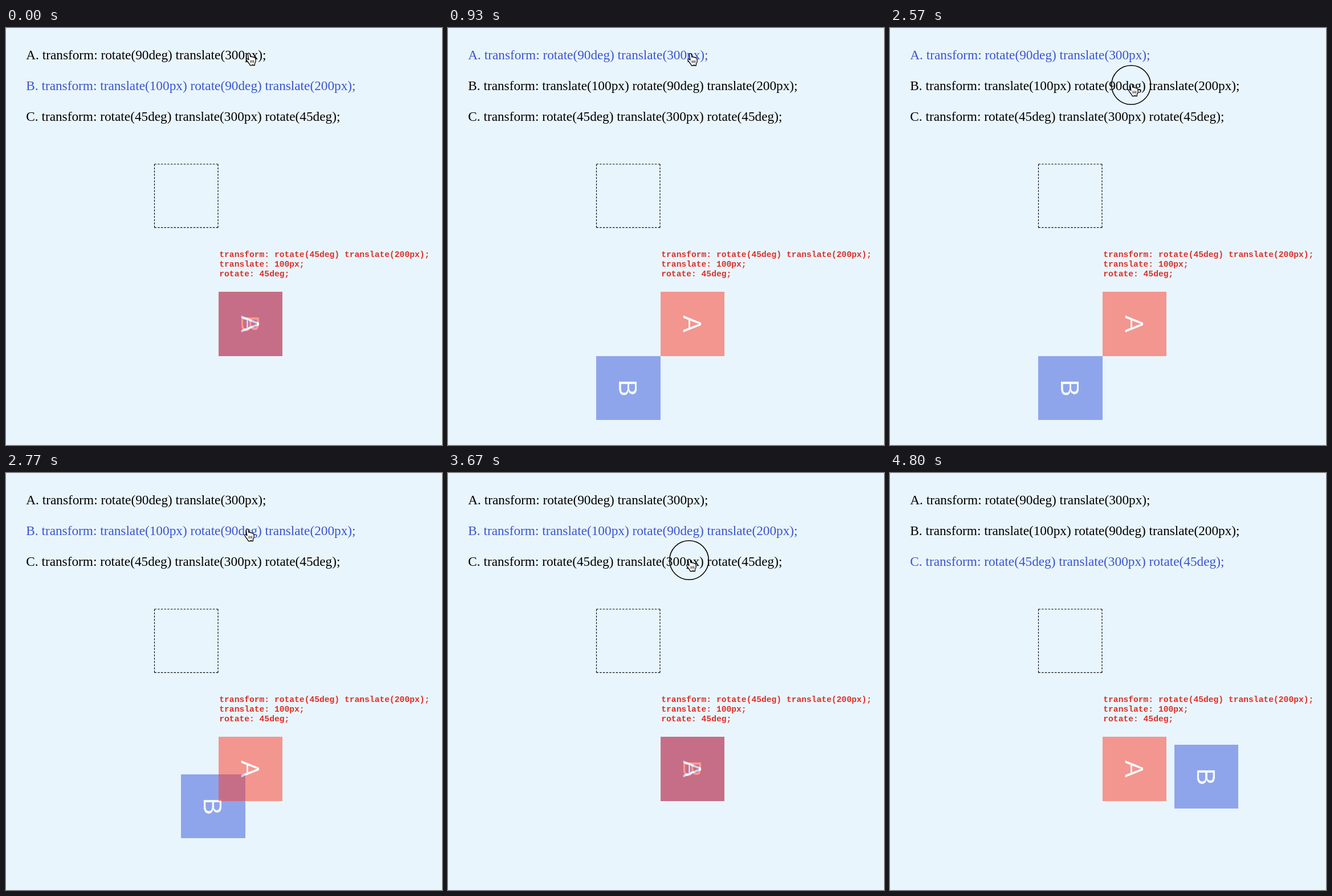
Write an HTML page with a canvas that moves like this. It is 765 px wide and 732 px high and loops after 4830 ms.

```html
<!DOCTYPE html>
<html lang="en">
<head>
<meta charset="utf-8">
<title>Transform order</title>
<style>
  html, body { margin: 0; width: 100%; height: 100%; overflow: hidden; background: #e9f5fc; }
  canvas { display: block; }
</style>
</head>
<body>
<canvas id="stage" width="765" height="732"></canvas>
<script>
const ctx = document.getElementById('stage').getContext('2d');
const LOOP = 4830;
const MOVE = 300;
const PRESS = 130;
const UNIT = 1.125; // stage pixels per CSS pixel
const SIZE = 100 * UNIT;
const HOME = { x: 316.5, y: 294.4 };
const BLUE = '#3a55d0';
const SERIF = '23.28px "Liberation Serif", "Times New Roman", serif';
const MONO = 'bold 14.65px "Liberation Mono", "Courier New", monospace';
const SANS = '45px "Liberation Sans", Arial, sans-serif';

const diagonal = 300 * Math.SQRT1_2;
const options = [
  { text: 'A. transform: rotate(90deg) translate(300px);', x: 0, y: 300, click: 210 },
  { text: 'B. transform: translate(100px) rotate(90deg) translate(200px);', x: 100, y: 200, click: 2695 },
  { text: 'C. transform: rotate(45deg) translate(300px) rotate(45deg);', x: diagonal, y: diagonal, click: 3795 }
];
const notes = [
  'transform: rotate(45deg) translate(200px);',
  'translate: 100px;',
  'rotate: 45deg;'
];
// Pointer stops: time, x, y
const pointer = [
  [0, 426, 43.5], [60, 425, 44], [2160, 425, 44], [2460, 423, 97.5],
  [3270, 423, 97.5], [3570, 423, 150.5], [4480, 423, 150.5], [4700, 425, 30]
];

const lerp = (a, b, k) => a + (b - a) * k;
const clamp = v => Math.min(1, Math.max(0, v));
const smooth = k => k * k * (3 - 2 * k);

// CSS "ease": cubic-bezier(.25, .1, .25, 1)
function ease(x) {
  if (x <= 0 || x >= 1) return clamp(x);
  const curve = (a, b, u) => 3 * a * u * (1 - u) ** 2 + 3 * b * u * u * (1 - u) + u ** 3;
  let lo = 0, hi = 1;
  for (let i = 0; i < 24; i++) {
    const mid = (lo + hi) / 2;
    if (curve(.25, .25, mid) < x) lo = mid; else hi = mid;
  }
  return curve(.1, 1, lo);
}

function selection(t) {
  if (t < options[0].click) return { from: 1, to: 1, k: 1 };
  const to = options.findLastIndex(o => t >= o.click);
  const from = to === 0 ? 1 : to - 1;
  return { from, to, k: ease((t - options[to].click) / MOVE) };
}

function drawText(text, x, y, font, color) {
  ctx.font = font;
  ctx.fillStyle = color;
  ctx.fillText(text, x, y);
}

// Box and label are flattened first, so opacity applies to the card as a whole.
function makeCard(label, color) {
  const scale = 4;
  const image = document.createElement('canvas');
  image.width = image.height = SIZE * scale;
  const c = image.getContext('2d');
  c.scale(scale, scale);
  c.fillStyle = color;
  c.fillRect(0, 0, SIZE, SIZE);
  c.font = SANS;
  c.textAlign = 'center';
  c.fillStyle = '#fff';
  c.fillText(label, SIZE / 2, SIZE / 2 + 16.3);
  return image;
}
const cardA = makeCard('A', 'rgb(253,55,34)');
const cardB = makeCard('B', 'rgb(51,85,220)');

function drawCard(card, x, y) {
  ctx.save();
  ctx.globalAlpha = .5;
  ctx.translate(HOME.x + x * UNIT, HOME.y + y * UNIT);
  ctx.rotate(Math.PI / 2);
  ctx.drawImage(card, -SIZE / 2, -SIZE / 2, SIZE, SIZE);
  ctx.restore();
}

// Each side begins and ends with a full dash.
function drawDashedBox(left, top, right, bottom) {
  const dash = 3 * UNIT;
  const side = (x0, y0, x1, y1) => {
    const length = Math.hypot(x1 - x0, y1 - y0);
    const gaps = Math.round((length - dash) / (5 * UNIT));
    ctx.setLineDash([dash, (length - dash) / gaps - dash]);
    ctx.beginPath();
    ctx.moveTo(x0, y0);
    ctx.lineTo(x1, y1);
    ctx.stroke();
  };
  ctx.strokeStyle = '#000';
  ctx.lineWidth = UNIT;
  side(left, top, right, top);
  side(left, bottom, right, bottom);
  side(left, top, left, bottom);
  side(right, top, right, bottom);
  ctx.setLineDash([]);
}

const hand = new Path2D(
  'M3.4 2.3C3.4 .3 6.4 .1 6.9 2.1L8 7.2C8.7 6.2 10.5 6.2 10.9 7.6' +
  'C11.7 6.8 13.3 7 13.7 8.4C14.8 7.8 16.5 8.4 16.8 10.2L17.2 13.5' +
  'C17.3 16.2 16 17.5 15.4 19.2L15.3 22H12.6L11.9 20.6L10.7 22H7.2' +
  'C6.8 19.8 4.7 18 3.4 16.2L1.1 12.8C-.1 10.9 1.9 9.6 3.3 10.9L4.9 12.3Z');
const creases = new Path2D('M8.3 13V17.4M10.9 13V17.4M13.4 13V17.4');

function drawPointer(x, y) {
  ctx.save();
  ctx.translate(x - 5, y);
  ctx.fillStyle = '#fff';
  ctx.strokeStyle = '#000';
  ctx.lineJoin = 'round';
  ctx.fill(hand);
  ctx.lineWidth = 1.3;
  ctx.stroke(hand);
  ctx.lineWidth = 1;
  ctx.stroke(creases);
  ctx.restore();
}

function pointerAt(t) {
  const next = pointer.findIndex(p => p[0] > t);
  if (next < 1) return null;
  const [t0, x0, y0] = pointer[next - 1];
  const [t1, x1, y1] = pointer[next];
  const k = smooth((t - t0) / (t1 - t0));
  return { x: lerp(x0, x1, k), y: lerp(y0, y1, k) };
}

function draw(t) {
  ctx.fillStyle = '#e9f5fc';
  ctx.fillRect(0, 0, 765, 732);

  const { from, to, k } = selection(t);
  options.forEach((o, i) => drawText(o.text, 35.3, 54.5 + i * 54, SERIF, i === to ? BLUE : '#000'));
  drawDashedBox(260.5, 239, 372, 350.4);
  notes.forEach((line, i) => drawText(line, 374.3, 402 + i * 17, MONO, '#dc3028'));

  const a = options[from], b = options[to];
  drawCard(cardB, lerp(a.x, b.x, k), lerp(a.y, b.y, k));
  drawCard(cardA, 100, 200);

  const p = pointerAt(t);
  if (!p) return;
  drawPointer(p.x, p.y);
  if (options.some(o => t >= o.click - PRESS && t < o.click)) {
    ctx.lineWidth = 1.6;
    ctx.beginPath();
    ctx.arc(p.x, p.y + 2.5, 34.3, 0, Math.PI * 2);
    ctx.stroke();
  }
}

const start = performance.now();
function tick() {
  draw((performance.now() - start) % LOOP);
  requestAnimationFrame(tick);
}
tick();
</script>
</body>
</html>
```
